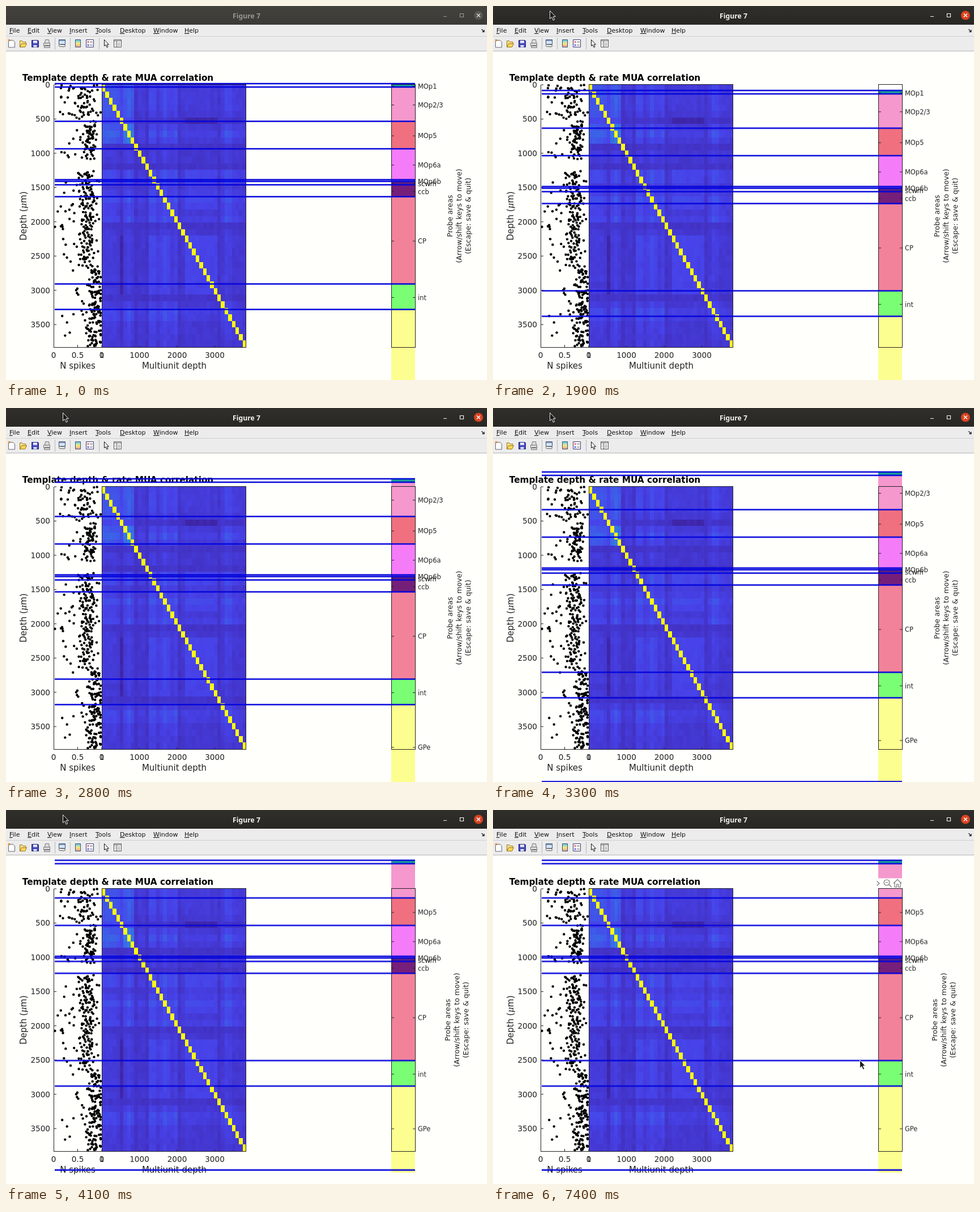
These frames come from a looping animation (849 px wide and 660 px high, 8000 ms). An HTML page:

```html
<!DOCTYPE html>
<html lang="en">
<head>
<meta charset="utf-8">
<title>Figure 7</title>
<style>
html, body { margin: 0; width: 100%; height: 100%; overflow: hidden; background: #fffffc; }
svg { display: block; width: 849px; height: 660px; font-family: "DejaVu Sans", sans-serif; fill: #222; }
.crisp { shape-rendering: crispEdges; }
.bar { font: bold 12.2px "Noto Sans", "Open Sans", sans-serif; }
.anim { animation: 8s step-end infinite; }
#active { animation-name: focus; }
#areas, #labels, #lines { --step: 12.09px; animation-name: shift; }
#probe { animation-name: nudge; }
#tools { animation-name: hover; }
.out1 { animation-name: out1; }
.out2 { animation-name: out2; }
.in1 { animation-name: in1; }
@keyframes focus { 0% { opacity: 0 } 8.75% { opacity: .5 } 10%, 100% { opacity: 1 } }
@keyframes shift {
  0%, 30% { transform: translateY(0) }
  23.75% { transform: translateY(var(--step)) }
  35% { transform: translateY(calc(-1 * var(--step))) }
  41.25% { transform: translateY(calc(-2 * var(--step))) }
  46.25% { transform: translateY(calc(-3 * var(--step))) }
  51.25%, 100% { transform: translateY(calc(-4 * var(--step))) }
}
@keyframes nudge { 0% { transform: translateX(0) } 51.25%, 100% { transform: translateX(-4px) } }
@keyframes out1 { 0% { opacity: 1 } 35%, 100% { opacity: 0 } }
@keyframes out2 { 0% { opacity: 1 } 51.25%, 100% { opacity: 0 } }
@keyframes in1 { 0% { opacity: 0 } 35%, 100% { opacity: 1 } }
@keyframes hover { 0% { opacity: 0 } 87.5%, 100% { opacity: 1 } }
</style>
</head>
<body>
<svg viewBox="0 0 849 660" xmlns="http://www.w3.org/2000/svg">
  <defs>
    <linearGradient id="dim" x2="0" y2="1"><stop stop-color="#43423d"/><stop offset="1" stop-color="#3b3a36"/></linearGradient>
    <linearGradient id="lit" x2="0" y2="1"><stop stop-color="#302f2b"/><stop offset="1" stop-color="#282723"/></linearGradient>
    <linearGradient id="hues" x2="0" y2="1"><stop stop-color="#58c4ee"/><stop offset=".5" stop-color="#f4ec80"/><stop offset="1" stop-color="#f09a88"/></linearGradient>
  </defs>
  <rect width="849" height="660" fill="#fffffc"/>

  <g id="idle" class="bar"></g>
  <g id="active" class="bar anim"></g>
  <rect y="33" width="849" height="47" fill="#ececec"/>
  <path d="M0 53.5H849" stroke="#cfcfcf"/>
  <path d="M0 79.5H849" stroke="#b4b4b4"/>
  <g id="menu" font-size="11" fill="#111"></g>
  <path d="M839.5 41l4 4M844 42v3.5h-3.5" fill="none" stroke="#222" stroke-width="1.3"/>

  <g fill="none" stroke="#555">
    <path d="M4.5 60.5h8l3 3v9.5h-11z" fill="#fff" stroke="#667"/>
    <path d="M4 59l3 3M7 59l-3 3" stroke="#e28a2a" stroke-width="1.5"/>
    <path d="M24.5 72.5v-11h4l1.5 2h5v3" fill="#f8e08a" stroke="#96761c"/>
    <path d="M24.5 72.5l3-6h9l-3 6z" fill="#ffd75a" stroke="#96761c"/>
    <path d="M45.5 60.5h11l1 1v11h-12z" fill="#4648b8" stroke="#23237c"/>
    <path d="M48 61h7v4.5h-7zM48.5 69h6v3.5h-6z" fill="#e4e6fa" stroke="none"/>
    <path d="M68.5 65.5l1-6h6l1 6M66.5 65.5h11v5h-11zM68.5 69.5h8l1 4h-10z" fill="#ddd" stroke="#777"/>
    <path d="M86.5 56v21M113.5 56v21M164.5 56v21" stroke="#b8b8b8"/>
    <path d="M93.5 59.5h11v8h-11zM93.5 61h11" fill="#d7e4f5" stroke="#34527c"/>
    <path d="M97 71.5a2.5 2 0 1 1 0-3.5h5a2.5 2 0 1 1 0 4z" fill="#eee"/>
    <path d="M122.5 59.5h9v13h-9z" fill="url(#hues)" stroke="#34527c"/>
    <path d="M141.5 59.5h13v13h-13z" fill="#fff" stroke="#3a3a78"/>
    <path d="M143.5 62h3v3h-3z" fill="#e07078" stroke="none"/>
    <path d="M143.5 67.5h3v3h-3z" fill="#6868d8" stroke="none"/>
    <path d="M148 63.5h5M148 69h5"/>
    <path d="M173.5 59.5v11l2.5-2 2 4.5 2-1-2-4h3.5z" fill="#fff" stroke="#111"/>
    <path d="M190.5 59.5h13v13h-13zM190.5 61.5h13M195.5 62v10" fill="#fff"/>
    <path d="M197 65h5M197 67.5h5M197 70h5M192 65h2M192 68h2" stroke="#888"/>
  </g>

  <g id="heat" class="crisp"></g>
  <g id="areas" class="crisp anim"></g>
  <g class="crisp" fill="none" stroke="#222">
    <path d="M84.5 139V602.5H169M84.5 602v-4M126.5 602v-4"/>
    <path d="M169.5 138.5H423.5V602.5H169.5z"/>
    <path d="M680.5 138.5H722.5V602.5H680.5z"/>
  </g>
  <g id="dots" fill="#000"></g>
  <g id="axes"></g>
  <g id="labels" class="anim"></g>
  <g id="probe" class="anim"></g>
  <g id="lines" class="anim"></g>

  <g id="tools" class="anim" fill="none" stroke="#777" stroke-width="1.2">
    <path d="M673 120.5h50v17.5h-50z" fill="#fffffc" stroke="none"/>
    <path d="M677.5 125.5l4.5 4-4.5 4"/>
    <circle cx="695" cy="128" r="5"/>
    <path d="M692.5 128h5M699 131.5l4.5 4.5M707 129.5l7-7 7 7M709 128v8h3.5v-5h3v5h3.5v-8"/>
  </g>
  <path id="pointer" d="M.5 .5V14.5L3.8 11.6L6.2 17.2L8.6 16.1L6.3 10.7H10.3z" fill="#1a1a1a" stroke="#fff" stroke-width=".9"/>
</svg>

<script>
const el = id => document.getElementById(id);
const put = (id, html) => el(id).insertAdjacentHTML('beforeend', html);
const rect = (x, y, w, h, fill) => `<rect x="${x}" y="${y}" width="${w}" height="${h}" fill="${fill}"/>`;
// y is the middle of the line
const text = (x, y, s, size, anchor = 'middle', extra = '') =>
  `<text x="${x}" y="${y + size * .36}" font-size="${size}" text-anchor="${anchor}" ${extra}>${s}</text>`;
const upright = (x, y, s, size) => text(x, y, s, size, 'middle', `transform="rotate(-90 ${x} ${y})"`);

let seed = 11;
const rnd = () => (seed = (seed * 16807) % 2147483647) / 2147483647;
const bell = () => (rnd() + rnd() + rnd() - 1.5) * 2;

// Window chrome
const titleBar = (bg, ink, round, cross) => rect(0, 0, 849, 33, bg) +
  `<text x="424.5" y="21.5" text-anchor="middle" fill="${ink}">Figure 7</text>
  <circle cx="834" cy="16.5" r="8" fill="${round}"/>
  <path d="M831 13.5l6 6M837 13.5l-6 6" stroke="${cross}" stroke-width="1.5"/>
  <path d="M772 18.5h6M801.5 13.5h6v6h-6z" fill="none" stroke="${ink}" stroke-width="1.2"/>`;
put('idle', titleBar('url(#dim)', '#98968f', '#575651', '#d8d6d0'));
put('active', titleBar('url(#lit)', '#f4f3ef', '#db4221', '#fff'));

const menu = { File: 6, Edit: 38, View: 73, Insert: 112, Tools: 158, Desktop: 201, Window: 260, Help: 315 };
for (const [name, x] of Object.entries(menu))
  put('menu', `<text x="${x}" y="47"><tspan text-decoration="underline">${name[0]}</tspan>${name.slice(1)}</text>`);

// Correlation matrix: shared activity per depth bin plus correlated blocks
const BINS = 40;
const peaks = [7, 13.4, 17, 20, 34.5], quiet = [5, 9, 12, 21, 32];
const activity = Array.from({ length: BINS }, (_, i) => {
  if (quiet.includes(i)) return .1;
  const lift = peaks.reduce((sum, p) => sum + Math.exp(-((i - p) ** 2)), 0);
  return .24 + .4 * lift + .1 * rnd() + (i < 4 ? .2 : 0);
});
const within = (i, a, b) => i >= a && i <= b;

function corr(i, j) {
  const lo = Math.min(i, j), hi = Math.max(i, j);
  let v = .055 + .3 * activity[i] * activity[j];
  if (hi < 9) v += .07;
  if (lo > 5 && hi < 9) v += .07;
  if (within(hi, 23, 31)) {
    if (lo > 22) v += .045;
    if (within(lo, 13, 18)) v += .025;
    if (lo === 5) v -= .05;
  }
  const n = Math.sin(lo * 12.9898 + hi * 78.233) * 43758.5453;
  return v + (n - Math.floor(n) - .5) * .025;
}

function shade(v) {
  const mix = (a, b, f) => a.map((c, k) => Math.round(c + (b[k] - c) * f));
  const dark = [62, 36, 165], mid = [71, 66, 233], light = [42, 148, 228];
  v = Math.max(0, v);
  return `rgb(${v < .125 ? mix(dark, mid, v / .125) : mix(mid, light, Math.min(1.1, (v - .125) / .25))})`;
}

const col = i => Math.round(169 + 255 * i / BINS), row = j => Math.round(139 + 463 * j / BINS);
let cells = '';
for (let j = 0; j < BINS; j++)
  for (let i = 0; i < BINS; i++)
    cells += rect(col(i), row(j), col(i + 1) - col(i), row(j + 1) - row(j),
      i === j ? '#fbfb14' : shade(corr(i, j)));
put('heat', cells);

// Spike scatter: [top, bottom, mean x, spread], with a sparse tail to the left
const bands = [[139, 200, 139, 12], [200, 272, 148, 6], [291, 462, 145, 8], [462, 601, 157, 6]];
let dots = '';
for (const [top, bottom, mean, spread] of bands)
  for (let k = 0; k < (bottom - top) * 1.15; k++) {
    const tail = rnd() < .2 ? rnd() * (mean - 88) : 0;
    const x = Math.min(167, mean + bell() * spread - tail), y = top + rnd() * (bottom - top);
    dots += `<circle cx="${x.toFixed(1)}" cy="${y.toFixed(1)}" r="2.2"/>`;
  }
put('dots', dots);

// Axis text
const TICK = 13.6, LABEL = 15;
for (let d = 0; d <= 3500; d += 500) {
  const y = 139 + d * .1209;
  put('axes', text(78, y, d, TICK, 'end') + `<path d="M85 ${y}h4" stroke="#222"/>`);
}
for (let k = 0; k < 3; k++) put('axes', text(84 + 42.5 * k, 616, k / 2, TICK));
for (let k = 0; k < 4; k++) {
  const x = 169 + 66.5 * k;
  put('axes', text(x, 616, 1000 * k, TICK) + `<path d="M${x} 602v-3" stroke="#222"/>`);
}
put('axes', text(126.5, 635, 'N spikes', LABEL) + text(297, 635, 'Multiunit depth', LABEL) +
  text(197.5, 126.2, 'Template depth &amp; rate MUA correlation', 15.25, 'middle', 'font-weight="bold" fill="#000"') +
  upright(30.5, 370.5, 'Depth (<tspan font-family="DejaVu Serif, serif" font-style="italic">μ</tspan>m)', LABEL));
['Probe areas', '(Arrow/shift keys to move)', '(Escape: save &amp; quit)']
  .forEach((s, k) => put('probe', upright(783 + k * 16, 370.5, s, 12.6)));

// Brain areas: [top, colour, label, visibility class]
const areas = [
  [137, '#1e9e96', 'MOp1', 'out1'],
  [143, '#f598cd', 'MOp2/3', 'out2'],
  [203.5, '#f07080', 'MOp5'],
  [252, '#f47cf8', 'MOp6a'],
  [306.5, '#b45fd0', 'MOp6b'],
  [309.5, '#5b2080', 'scwm'],
  [315.5, '#761f7a', 'ccb'],
  [336.5, '#f28299', 'CP'],
  [490.5, '#7aff74', 'int'],
  [535.5, '#fcfe90', 'GPe', 'in1'],
  [683.5, '#fcfe90']
];
areas.forEach(([top, fill, name, cls], k) => {
  const end = k + 1 < areas.length ? areas[k + 1][0] : 687.5;
  const y = (top + end) / 2 + 1.4;
  put('areas', rect(680, top, 42, end - top, fill));
  put('lines', `<path d="M86 ${top}H722" stroke="#0505dc" stroke-width="2.3"/>`);
  if (name) put('labels', `<g class="${cls ? 'anim ' + cls : ''}">` + text(727, y, name, 11.45, 'start') +
    `<path d="M681 ${y}h4M718 ${y}h4" stroke="#222"/></g>`);
});

// Pointer: holds, one jump, then an eased sweep sampled every 100 ms
const LOOP = 8000;
const at = (ms, x, y, opacity = 1) =>
  ({ offset: ms / LOOP, transform: `translate(${x}px, ${y}px)`, opacity, easing: 'step-end' });
const path = [at(0, 97, 13, 0), at(500, 97, 13), at(700, 100, 8), at(6100, 345, 103)];
for (let ms = 6400; ms <= 7200; ms += 100) {
  const u = (ms - 6300) / 900, e = u * u * (3 - 2 * u);
  path.push(at(ms, 345 + 300 * e, 103 + 340 * e));
}
path.push(at(7300, 646, 442), at(7400, 647, 441), at(LOOP, 647, 441));
el('pointer').animate(path, { duration: LOOP, iterations: Infinity });
</script>
</body>
</html>
```
